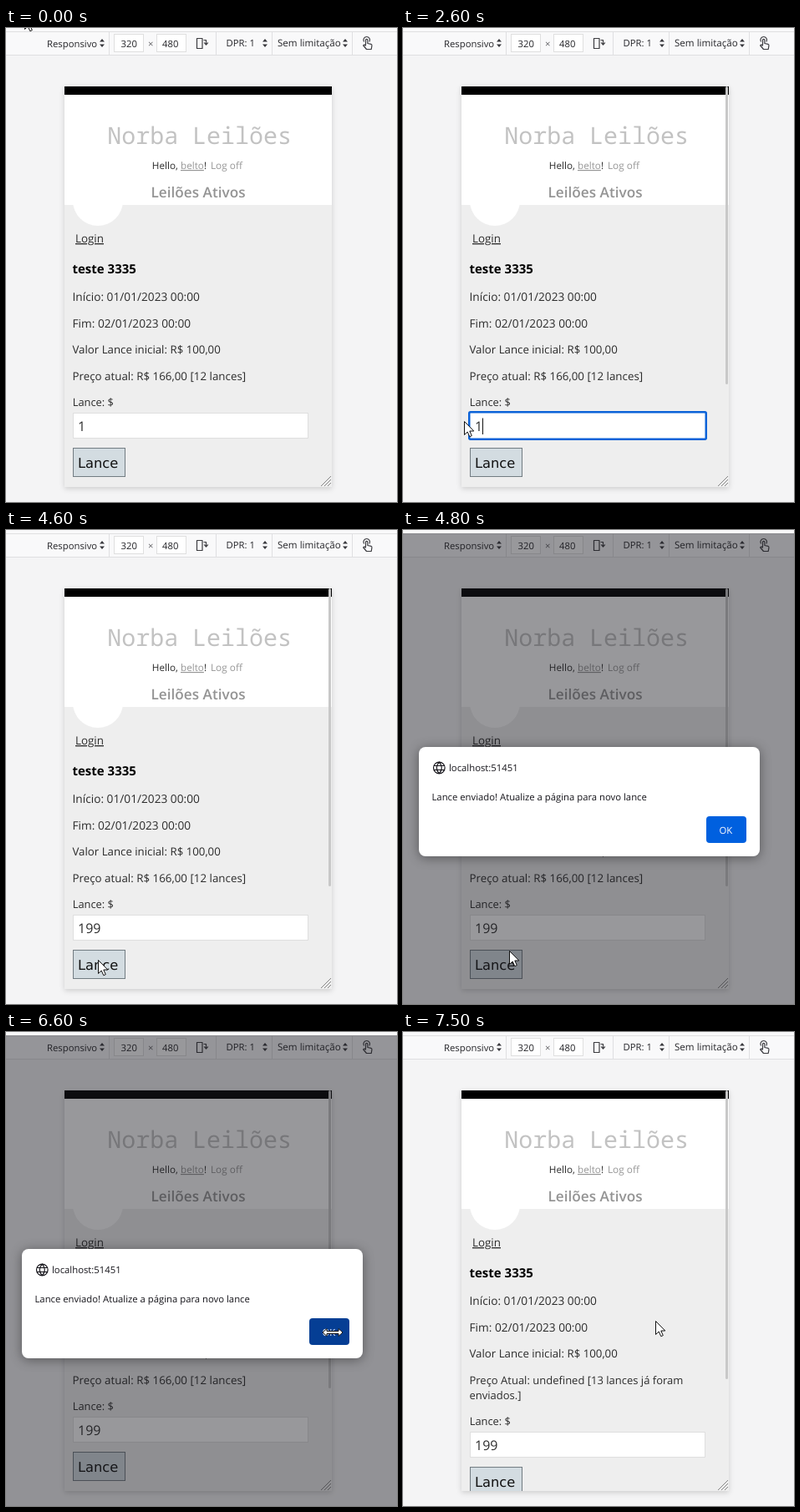
An HTML page that plays this animation: 468x568 px, repeating every 8 s.

```html
<!DOCTYPE html>
<html lang="pt">
<head>
<meta charset="utf-8">
<title>Leilões</title>
<style>
  html, body { margin: 0; width: 100%; height: 100%; overflow: hidden; background: #f4f4f5; }
  svg { display: block; width: 468px; height: 568px; }
  text { font-family: "Open Sans", "Noto Sans", sans-serif; fill: #2c2c2c; text-rendering: geometricPrecision; white-space: pre; }
  .bar text { font-size: 11.3px; fill: #26262a; }
  .sep { stroke: #dfdfe1; }
  .box { fill: #fff; stroke: #dfdfdf; }
  .icon { fill: none; stroke: #3b3b3f; stroke-width: 1.2; stroke-linejoin: round; stroke-linecap: round; }
  .dialog text { font-size: 11.3px; fill: #15141a; }
  .shadow { filter: drop-shadow(0 2px 3px rgba(0,0,0,.16)); }
  .deep { filter: drop-shadow(0 2px 7px rgba(0,0,0,.4)); }
</style>
</head>
<body>
<svg viewBox="0 0 468 568">
  <defs>
    <clipPath id="screen"><rect x="70" y="70" width="320" height="480"/></clipPath>
    <path id="sort" d="M-3 -1.5L0 -5L3 -1.5ZM-3 1.5L0 5L3 1.5Z" fill="#38383d"/>
  </defs>

  <rect width="468" height="568" fill="#f4f4f5"/>
  <g class="bar">
    <rect width="468" height="32" fill="#f9f9fa"/>
    <path class="sep" d="M0 4.5H468M0 32.5H468M123.500 5V32M251.500 5V32M318.500 5V32M414.500 5V32"/>
    <text x="49" y="22.500">Responsivo</text>
    <use href="#sort" x="115" y="18"/>
    <rect class="box" x="129.500" y="7.500" width="35" height="21"/>
    <text x="137.500" y="22.500">320</text>
    <text x="170" y="22.500" style="fill:#66666a">×</text>
    <rect class="box" x="180.500" y="7.500" width="35" height="21"/>
    <text x="187" y="22.500">480</text>
    <path class="icon" d="M228.500 12.500h6.500v12h-6.500zM237 14.500h2.500v5M237.500 17.800l2 2.200l2 -2.200"/>
    <text x="263.500" y="22">DPR: 1</text>
    <use href="#sort" x="310" y="18"/>
    <text x="325" y="22" style="font-size:11.6px">Sem limitação</text>
    <use href="#sort" x="406" y="18"/>
    <path class="icon" d="M430.500 20v-5.500a1.200 1.200 0 0 1 2.400 0v4l4 .8q1.300 .4 1 2l-.7 4.200h-5.700l-3.800 -4.500q.8 -1.600 2.800 0M428.300 16a3.800 3.800 0 1 1 6.800 0"/>
  </g>

  <rect class="shadow" x="70" y="70" width="320" height="480" fill="#eee"/>
  <g clip-path="url(#screen)">
    <rect x="70" y="70" width="320" height="142" fill="#fff"/>
    <rect x="70" y="70" width="320" height="10"/>
    <circle cx="110" cy="207" r="30" fill="#fff"/>
    <text x="231.600" y="139" text-anchor="middle" style="font:28.300px 'Noto Sans Mono',monospace;fill:#c2c2c2">Norba Leilões</text>
    <text x="174.800" y="169" font-size="11.700">Hello,</text>
    <text x="209" y="169" font-size="11.700" style="fill:#969696" text-decoration="underline">belto</text>
    <text x="236.900" y="169" font-size="11.700">!</text>
    <text x="245" y="169" font-size="11.800" style="fill:#969696">Log off</text>
    <text x="173.500" y="203" font-size="17.200" font-weight="600" style="fill:#949494">Leilões Ativos</text>
    <text x="83" y="257" font-size="13.400" text-decoration="underline">Login</text>
    <text x="79.500" y="294" font-size="15" font-weight="700" style="fill:#000">teste 3335</text>
    <text x="79.500" y="327" font-size="13.700">Início: 01/01/2023 00:00</text>
    <text x="79.500" y="359" font-size="13.700">Fim: 02/01/2023 00:00</text>
    <text x="79.500" y="390" font-size="13.250">Valor Lance inicial: R$ 100,00</text>
    <text id="price" x="79.500" y="422" font-size="13.350"></text>
    <text id="more" x="79.500" y="440" font-size="13">enviados.]</text>
    <g id="form">
      <text x="79.700" y="453" font-size="12.900">Lance: $</text>
      <rect class="box" x="80.500" y="461.500" width="281" height="30"/>
      <rect id="focus" x="79.250" y="460.250" width="283.500" height="32.500" rx="1.500" fill="#fff" stroke="#0a62d8" stroke-width="2.500"/>
      <text id="value" x="86" y="483" font-size="16"></text>
      <path id="caret" d="M.5 467.500V487" stroke="#111"/>
      <rect x="80.500" y="503.500" width="62" height="34" fill="#d3dce1" stroke="#727c82"/>
      <text x="86" y="527" style="font:16.300px 'DejaVu Sans',sans-serif;fill:#111">Lance</text>
    </g>
    <path d="M377 549L389 537M381 549L389 541M385 549L389 545" stroke="#858585"/>
    <rect id="thumb" x="386" y="70" width="3" rx="1.500" fill="#c8c8c8"/>
  </g>

  <g id="modal" class="dialog">
    <rect y="4" width="468" height="564" fill="#1c1b22" opacity=".45"/>
    <rect class="deep" x="19" y="260" width="408" height="131" rx="8" fill="#fff"/>
    <path class="icon" d="M36.500 285a6.800 6.800 0 1 0 13.600 0a6.800 6.800 0 1 0 -13.600 0M37.200 282.500h12.200M37.200 287.500h12.200M43.300 278.200q-6 6.800 0 13.600q6 -6.800 0 -13.600" style="stroke:#15141a"/>
    <text x="55" y="289">localhost:51451</text>
    <text x="34.500" y="324">Lance enviado! Atualize a página para novo lance</text>
    <rect id="ok" x="363" y="343" width="48" height="32" rx="4"/>
    <text x="378.500" y="363.500" style="fill:#fff">OK</text>
  </g>

  <g id="cursor">
    <path id="arrow" d="M.5 .5V16.500L4.200 13L6.800 18.700L9.300 17.600L6.800 12H11.800Z" fill="#fff" stroke="#111"/>
    <path id="beam" d="M-2 -5.500H2.500M.5 -5.500V5.500M-2 5.500H2.500" stroke="#f6f6f6" fill="none"/>
    <path id="resize" d="M-14 0l5 -4.500v3h14v-3l5 4.500l-5 4.500v-3h-14v3z" fill="#fff" stroke="#111"/>
  </g>
</svg>
<script>
const LOOP = 8000, STEP = 100;
const el = id => document.getElementById(id);
const show = (id, on) => el(id).setAttribute('visibility', on ? 'visible' : 'hidden');
const set = (id, name, v) => el(id).setAttribute(name, v);

// time, x, y of the pointer's hot spot
const path = [
  [200, 22, -15], [800, 94, 528], [1100, 115, 467], [1200, 115, 467],
  [1300, 113, 467], [1500, 112, 467], [2500, 112, 467],
  [2600, 73, 471], [2800, 73, 471], [3200, 112, 512], [3400, 112, 512],
  [3700, 142, 383], [4000, 120, 541], [4200, 104, 520], [4500, 104, 520],
  [4600, 110, 515], [4700, 110, 515], [4800, 127, 504], [5600, 407, 350],
  [5700, 407, 359], [5800, 407, 359], [6000, 394, 359], [6100, 394, 359],
  [6300, 393, 360], [6600, 393, 360], [7000, 302, 357], [7200, 302, 357],
  [7500, 302, 346]
];

function pointer(t) {
  const i = path.findIndex(k => k[0] > t);
  if (i === 0) return path[0].slice(1);
  if (i < 0) return path[path.length - 1].slice(1);
  const [t0, x0, y0] = path[i - 1], [t1, x1, y1] = path[i];
  const u = (t - t0) / (t1 - t0);
  return [x0 + (x1 - x0) * u, y0 + (y1 - y0) * u].map(Math.round);
}

function draw(t) {
  const open = t >= 4800 && t < 6700, sent = t >= 6700;
  const value = t < 2700 ? '1' : t < 2900 ? '19' : '199';

  el('value').textContent = value;
  show('focus', t >= 1700 && t < 4400);
  show('caret', t >= 1800 && t < 4400);
  set('caret', 'transform', `translate(${86 + 9 * value.length})`);

  el('price').textContent = sent
    ? 'Preço Atual: undefined [13 lances já foram'
    : 'Preço atual: R$ 166,00 [12 lances]';
  set('price', 'font-size', sent ? 13 : 13.35);
  show('more', sent);
  set('form', 'transform', `translate(0 ${sent ? 18 : 0})`);
  show('thumb', t >= 500);
  set('thumb', 'height', sent ? 346 : 357);

  show('modal', open);
  set('ok', 'fill', t < 5500 ? '#0060df' : t < 6500 ? '#0250bb' : '#053e94');

  const [x, y] = pointer(t);
  const resize = t === 6600;
  const beam = !open && !sent && x > 80 && x < 362 && y > 461 && y < 492;
  set('cursor', 'transform', resize ? 'translate(393 360)' : `translate(${x} ${y})`);
  show('resize', resize);
  show('beam', beam);
  show('arrow', !beam && !resize);
}

const start = performance.now();
function tick() {
  const t = (performance.now() - start) % LOOP;
  draw(Math.floor(t / STEP) * STEP);
  requestAnimationFrame(tick);
}
tick();
</script>
</body>
</html>
```
